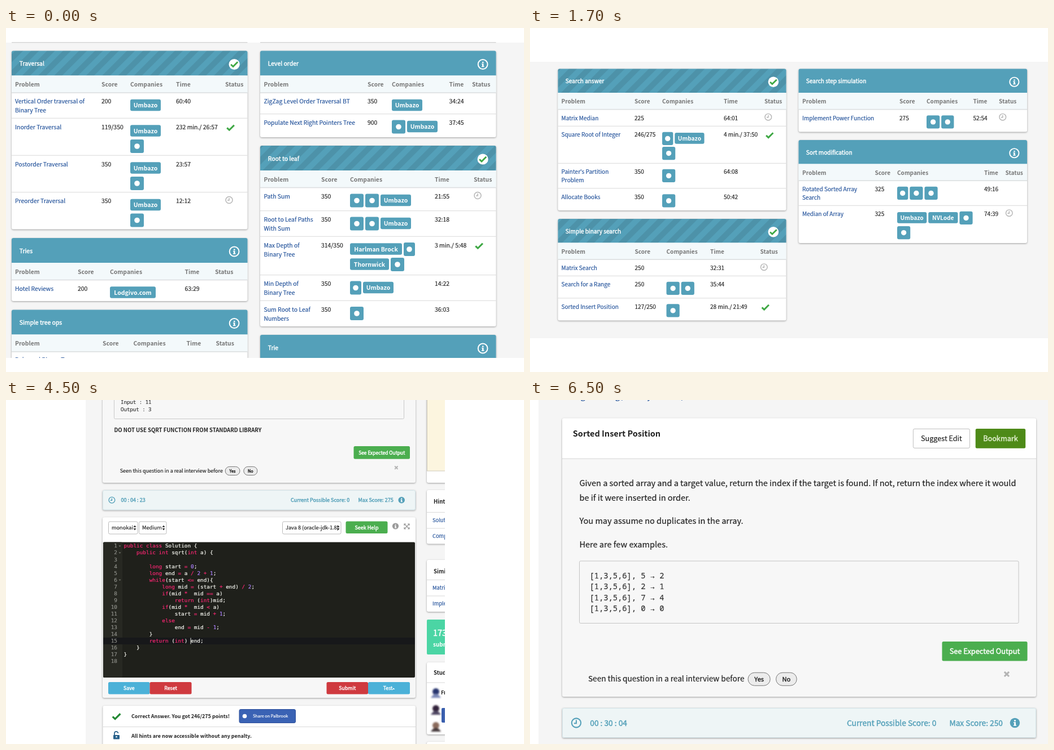
Write an HTML page that moves like this. It is 917 by 611 pixels and loops after 8 s.

```html
<!DOCTYPE html>
<html lang="en">
<head>
<meta charset="utf-8">
<title>Coding practice</title>
<style>
  html, body { margin: 0; width: 100%; height: 100%; overflow: hidden; background: #fff; }
  svg { display: block; width: 917px; height: 611px; }
  text { font-family: "Noto Sans CJK SC", "Noto Sans CJK JP", "Noto Sans CJK", "Open Sans", sans-serif;
         fill: currentColor; stroke: currentColor; stroke-width: .18; white-space: pre; }
  .m { stroke-width: .42; }
  .b { font-weight: 700; stroke-width: 0; }
  .mono { font-family: "Noto Sans Mono", "DejaVu Sans Mono", monospace; }
  .code { font-family: "DejaVu Sans Mono", monospace; stroke-width: .2; }
  .card { filter: drop-shadow(0 1px 1.5px rgba(0, 0, 0, .36)); }
</style>
</head>
<body>
<svg id="stage" viewBox="0 0 917 611" xmlns="http://www.w3.org/2000/svg"></svg>
<script>
const TEAL = '#54a0b9', LINK = '#24539b', INK = '#222', GREEN = '#4bae4f', PAGE = '#f5f5f5', BODY = '#f7f7f7';
const LINE = '#d9d9d9', MUTED = '#777', CODE_RED = '#bd1442', BLUE = '#4bb1d8', RED = '#cf3a3f';

const esc = s => String(s).replace(/&/g, '&amp;').replace(/</g, '&lt;');
const text = (x, y, s, size, color = INK, cls = '', anchor = 'start') =>
  `<text x="${x}" y="${y}" font-size="${size}" color="${color}" class="${cls}" text-anchor="${anchor}">${esc(s)}</text>`;
const rect = (x, y, w, h, fill, r = 0, extra = '') =>
  `<rect x="${x}" y="${y}" width="${w}" height="${h}" rx="${r}" fill="${fill}" ${extra}/>`;
const edge = color => `stroke="${color}" stroke-width="1"`;
const card = (x, y, w, h, fill = '#fff') => rect(x, y, w, h, fill, 3, 'class="card"');
const rule = (x, y, w, color = LINE) => rect(x, y - .5, w, 1, color);
const dot = (x, y, r, fill, extra = '') => `<circle cx="${x}" cy="${y}" r="${r}" fill="${fill}" ${extra}/>`;
const path = (d, color, width, extra = '') =>
  `<path d="${d}" fill="none" stroke="${color}" stroke-width="${width}" ${extra}/>`;
const at = (x, y, k, body) => `<g transform="translate(${x} ${y}) scale(${k})">${body}</g>`;

// icons, drawn around their centre
const tick = (x, y, k, color = '#3fa845') => at(x, y, k, path('M-6.3 .3L-2.2 4.2L6.4 -4.4', color, 3));
const clock = (x, y, r, color, width) =>
  at(x, y, r / 6, dot(0, 0, 6, 'none', `stroke="${color}" stroke-width="${width}"`) + path('M0 -3.6V.6H-3', color, width));
const glyphI = color => `<path d="M-1.3 -5h2.8v2.4h-2.8zM-2.3 -1.4h3.8v5h1.1v1.6h-5v-1.6h1.2v-3.4h-1.1z" fill="${color}"/>`;
const infoRing = (x, y, k) => at(x, y, k, dot(0, 0, 8.4, 'none', 'stroke="#fff" stroke-width="2"') + at(0, 0, .9, glyphI('#fff')));
const infoDisc = (x, y, r, color) => at(x, y, r / 8.5, dot(0, 0, 8.5, color) + glyphI('#fff'));
const doneDisc = (x, y, k) => dot(x, y, 9.6 * k, '#fff') + tick(x, y, .95 * k);
const cross = (x, y, k) => at(x, y, k, path('M-4 -4L4 4M4 -4L-4 4', '#b4b4b4', 3));

function button(x, y, w, h, label, size, fill, color = '#fff', border = 'none') {
  return rect(x, y, w, h, fill, 2.5, edge(border)) +
    text(x + w / 2, y + h / 2 + size * .37, label, size, color, border === 'none' ? 'm' : '', 'middle');
}

// company chips: a word is a label, a number is the width of a plain tile
const chipWidth = { 'Umbazo': 54, 'Lodgivo.com': 81, 'Harlman Brock': 92, 'Thornwick': 69, 'NVLode': 54 };
function chips(x, base, lines, k) {
  let out = '';
  lines.forEach((line, i) => {
    let left = x;
    const mid = base + (3 + 27 * i) * k;
    for (const c of line) {
      const tile = typeof c === 'number', w = (tile ? c : chipWidth[c]) * k, h = (tile ? 24 : 20.5) * k;
      out += rect(left, mid - h / 2 + (tile ? .5 : 0), w, h, TEAL, 3) + (tile
        ? dot(left + w / 2, mid + .5, 4.8 * k, '#fff')
        : text(left + w / 2, mid + 4.2 * k, c, 10.5 * k, '#fff', 'b', 'middle'));
      left += w + 3 * k;
    }
  });
  return out;
}

const HEADS = ['Problem', 'Score', 'Companies', 'Time', 'Status'];
// rows: [baseline, problem, score, chips, time, status]
function panel(k, x, y, w, bottom, title, done, cols, rows) {
  const head = 44 * k, size = 10.4 * k, first = y + 74.5 * k;
  const shape = `M${x} ${y + head}V${y + 3}q0 -3 3 -3h${w - 6}q3 0 3 3V${y + head}z`;
  let out = card(x, y, w, bottom - y) + `<path d="${shape}" fill="${TEAL}"/>`;
  if (done) out += `<path d="${shape}" fill="url(#stripes)"/>`;
  out += text(x + 13.8 * k, y + 26.7 * k, title, size, '#fff', 'm');
  out += (done ? doneDisc : infoRing)(x + w - 23.4 * k, y + 24 * k, k);
  out += rect(x, y + head, w, first - y - head, '#f3f9fb');
  out += rect(x, first - .8, w, 1.6, '#dcdfe0');
  HEADS.forEach((h, i) => { out += text(cols[i], y + 63.8 * k, h, size, MUTED, 'b'); });
  rows.forEach(([base, problem, score, firms, time, status], i) => {
    if (i) out += rule(x, base - 19.3 * k, w);
    problem.split('\n').forEach((s, n) => { out += text(cols[0], base + 16 * k * n, s, size, LINK); });
    out += text(cols[1], base, score, size) + chips(cols[2], base, firms, k) + text(cols[3], base, time, size);
    if (status === 'done') out += tick(cols[4] + 9.5 * k, base - 2.5 * k, k);
    if (status === 'late') out += clock(cols[4] + 7 * k, base - 5.5 * k, 6 * k, '#b5b5b5', 1.5);
  });
  return out;
}

const U = 'Umbazo';

function treeTopics() {
  const p = (...a) => panel(1, ...a);
  return `<g clip-path="url(#band)">` + rect(0, 26, 917, 560, PAGE) +
    rect(10, 25, 417.5, 1.4, '#d4d4d4') + rect(450, 25, 417.5, 1.4, '#d4d4d4') +
    p(10, 40.5, 417.5, 357.5, 'Traversal', true, [16, 169, 220, 301, 388], [
      [134, 'Vertical Order traversal of\nBinary Tree', '200', [[U]], '60:40'],
      [179.5, 'Inorder Traversal', '119/350', [[U], [24]], '232 min./ 26:57', 'done'],
      [245.5, 'Postorder Traversal', '350', [[U], [24]], '23:57'],
      [311, 'Preorder Traversal', '350', [[U], [24]], '12:12', 'late']]) +
    p(10, 373, 417.5, 485, 'Tries', false, [16, 127, 184, 316.5, 370], [
      [466.5, 'Hotel Reviews', '200', [['Lodgivo.com']], '63:29']]) +
    p(10, 500.5, 417.5, 640, 'Simple tree ops', false, [16, 171, 225.5, 319.5, 371.5], [
      [593, 'Balanced Binary Tree', '', [], '']]) +
    p(450, 40.5, 417.5, 194, 'Level order', false, [456.5, 640, 683, 784.5, 825], [
      [134, 'ZigZag Level Order Traversal BT', '350', [[U]], '34:24'],
      [172, 'Populate Next Right Pointers Tree', '900', [[24, U]], '37:45']]) +
    p(450, 209, 417.5, 530, 'Root to leaf', true, [456.5, 558, 609, 759, 828], [
      [303, 'Path Sum', '350', [[24, 24, U]], '21:55', 'late'],
      [344, 'Root to Leaf Paths\nWith Sum', '350', [[24, 24, U]], '32:18'],
      [389.5, 'Max Depth of\nBinary Tree', '314/350', [['Harlman Brock', 20], ['Thornwick', 24]], '3 min./ 5:48', 'done'],
      [458, 'Min Depth of\nBinary Tree', '350', [[20, U]], '14:22'],
      [503.5, 'Sum Root to Leaf\nNumbers', '350', [[24]], '36:03']]) +
    p(450, 545, 417.5, 660, 'Trie', false, [456.5, 640, 683, 784, 825], []) + `</g>`;
}

function searchTopics() {
  const p = (...a) => panel(.968, ...a);
  return rect(0, 60, 917, 491, PAGE) +
    p(49.5, 72.5, 404, 324, 'Search answer', true, [55.5, 185, 234, 343, 415], [
      [163.5, 'Matrix Median', '225', [], '64:01', 'late'],
      [193, 'Square Root of Integer', '246/275', [[20, U], [24]], '4 min./ 37:50', 'done'],
      [259, "Painter's Partition\nProblem", '350', [[24]], '64:08'],
      [303.5, 'Allocate Books', '350', [[24]], '50:42']]) +
    p(49.5, 339, 404, 519.5, 'Simple binary search', true, [55.5, 185.5, 241.5, 319, 407.5], [
      [430, 'Matrix Search', '250', [], '32:31', 'late'],
      [459, 'Search for a Range', '250', [[24, 24]], '35:44'],
      [498.5, 'Sorted Insert Position', '127/250', [[24]], '28 min./ 21:49', 'done']]) +
    p(475.5, 72.5, 404.5, 184.5, 'Search step simulation', false, [482, 654, 702, 784.5, 830], [
      [163.5, 'Implement Power Function', '275', [[24, 23]], '52:54', 'late']]) +
    p(475.5, 199, 404.5, 382, 'Sort modification', false, [482, 610.5, 650, 804, 841.5], [
      [290, 'Rotated Sorted Array\nSearch', '325', [[20, 24, 24]], '49:16'],
      [334, 'Median of Array', '325', [[U, 'NVLode', 24], [24]], '74:39', 'late']]);
}

// question card: header with title and two buttons
function questionHead(x, y, w, h, k, title) {
  const right = x + w, head = 70.5 * k;
  return card(x, y, w, h, BODY) + rect(x, y, w, head, '#fff', 3) + rule(x, y + head, w, '#d5d5d5') +
    text(x + 18.5 * k, y + 32 * k, title, 14.25 * k, INK, 'b') +
    button(right - 214 * k, y + 18.5 * k, 98.5 * k, 33.5 * k, 'Suggest Edit', 12.4 * k, '#fff', INK, '#bdbdbd') +
    button(right - 105.5 * k, y + 18.3 * k, 87 * k, 34 * k, 'Bookmark', 12.5 * k, '#4e8a18', '#e3f0d2');
}

// question card: green button and interview poll; y is the top of the button
function questionFoot(x, right, y, k) {
  const chip = (dx, w, s) => rect(x + dx * k, y + 54.3 * k, w * k, 22.7 * k, '#ececec', 11.3 * k, edge('#777')) +
    text(x + (dx + w / 2) * k, y + 70 * k, s, 10.8 * k, INK, 'm', 'middle');
  return button(right - 148.5 * k, y, 148.5 * k, 34 * k, 'See Expected Output', 12.6 * k, GREEN) +
    text(x, y + 70 * k, 'Seen this question in a real interview before', 13.4 * k) +
    chip(278.3, 38.5, 'Yes') + chip(327, 36, 'No') + cross(right - 36 * k, y + 57 * k, k);
}

function timerBar(x, y, w, h, k, time, max, scoreX, maxX) {
  const mid = y + h / 2, base = mid + 5 * k, size = 13.5 * k, right = x + w;
  return card(x, y, w, h, '#eef5f6') + rect(x + .5, y + .5, w - 1, h - 1, 'none', 3, edge('#d3e4e8')) +
    clock(x + 24.5 * k, mid, 8 * k, TEAL, 1.5) + text(x + 48.5 * k, base, time, size, TEAL, 'm') +
    text(scoreX, base, 'Current Possible Score: 0', size, TEAL, 'm') +
    text(maxX, base, 'Max Score: ' + max, size, TEAL, 'm') + infoDisc(right - 37 * k, mid, 8.6 * k, TEAL);
}

function sqrtQuestion() {
  const pill = (x, base, w, s) => rect(x, base - 16, w, 22, '#ebebeb', 3) + text(x + 5.8, base, s, 13.42, CODE_RED, 'mono');
  const body = (x, y, s, cls) => text(x, y, s, 14.3, INK, cls);
  return rect(0, 42, 917, 527, PAGE) + questionHead(28.5, 56, 825, 506.5, 1, 'Square Root of Integer') +
    body(59, 175, 'Implement int') + pill(157, 175, 101, 'sqrt(int x)') + body(257.5, 175, '.') +
    body(59, 216, 'Compute and return the') + body(222.5, 216, 'square root of', 'b') +
    pill(325.5, 216, 19, 'x') + body(345, 216, '.') +
    body(59, 257, 'If') + pill(71, 257, 18.5, 'x') + body(93, 257, 'is not a perfect square, return') +
    pill(293, 257, 124, 'floor(sqrt(x))') + body(59, 298, 'Example :', 'b') +
    rect(59.5, 321.5, 763.5, 71, BODY, 2, edge('#c4c4c4')) +
    text(76, 352, 'Input : 11', 13.5, '#333', 'mono') + text(76, 371, 'Output : 3', 13.5, '#333', 'mono') +
    text(59, 427, 'DO NOT USE SQRT FUNCTION FROM STANDARD LIBRARY', 14.2, INK, 'b') +
    questionFoot(73.5, 838, 465, 1) +
    card(883, 56, 60, 506.5) + rule(883, 113.5, 34, '#bbb') + text(901, 88, 'Notes', 14.25, INK, 'b') +
    rect(883.5, 114, 60, 417, '#fcf5df', 0, edge('#cfcabb')) + rect(884, 114, 33, 16, '#ebe3cc') + rect(888.5, 115, 1, 14, '#777');
}

const PROGRAM = `public class Solution {
    public int sqrt(int a) {

        long start = 0;
        long end = a / 2 + 1;
        while(start <= end){
            long mid = (start + end) / 2;
            if(mid *  mid == a)
                return (int)mid;
            if(mid *  mid < a)
                start = mid + 1;
            else
                end = mid - 1;
        }
        return (int) end;
    }
}
`;

function colorOf(token) {
  if (/^(public|class|int|long|while|if|return|else)$|^[=<*+\/-]+$/.test(token)) return '#f92672';
  return /^\d+$/.test(token) ? '#ae81ff' : '#f8f8f2';
}

function editor() {
  const step = 12.06, size = 9.4;
  let out = rect(172, 252.5, 552, 240.5, '#1f201b', 2) + rect(172, 252.5, 34, 240.5, '#272822', 2) +
    rect(172, 422, 552, 12, '#17181a');
  PROGRAM.split('\n').forEach((line, i) => {
    const y = 262.4 + step * i;
    out += text(197, y, i + 1, size, '#8f908a', 'code', 'end');
    if ([0, 1, 5].includes(i)) out += `<path d="M199.5 ${y - 4}h4l-2 2.4z" fill="#77786f"/>`;
    const spans = line.split(/(\w+|[=<*+\/-]+)/).map(t => `<tspan fill="${colorOf(t)}" stroke="${colorOf(t)}">${esc(t)}</tspan>`);
    out += `<text x="208.5" y="${y}" font-size="${size}" class="code">${spans.join('')}</text>`;
  });
  return out + rect(326.5, 422.5, 1, 11, '#e8e8e0');
}

function sideColumn() {
  const list = (y, h, head, title, items) => card(745, y, 60, h) + text(757, y + 24, title, 9.6, INK, 'b') +
    rule(745, y + head, 60) + items.map((s, i) =>
      (i ? rule(745, y + head + 28.5 * i, 60) : '') + text(755, y + head + 17.5 + 28.3 * i, s, 9.3, LINK)).join('');
  const face = (y, top, low) => `<g filter="url(#soft)">` + dot(761, y - 2, 6, top) +
    `<path d="M752 ${y + 9}q9 -14 18 0z" fill="${low}"/></g>`;
  return card(745, -20, 60, 167) + rect(745.5, -20, 60, 146, '#fcf5df', 0, edge('#cfcabb')) +
    list(160, 95.5, 39.5, 'Hints', ['Solution', 'Complete']) +
    list(284, 92, 35.5, 'Similar', ['Matrix', 'Implement']) +
    rect(745, 390, 60, 62, '#4bd5a4', 2) + text(756, 418.5, '173', 14.5, '#fff', 'm') +
    text(756, 437.5, 'submissions', 10, '#fff', 'b') +
    card(745, 466, 60, 128) + text(757, 487.5, 'Students', 9.6, INK, 'b') + rule(745, 502, 60) +
    face(520, '#28346e', '#7c88b8') + face(550, '#33203a', '#4d4460') + face(580, '#8a6a5c', '#463a3c') +
    text(770, 523, 'Friends', 9, INK, 'b') + rect(771, 547, 30, 26, '#3a5fae', 2) + card(745, 607, 60, 30);
}

function solution() {
  const k = .67;
  const select = (x, w, s) => rect(x, 216, w, 22, '#fff', 2.5, edge('#bbb')) + text(x + 5.5, 230.4, s, 9.2) +
    `<path d="M${x + w - 7.5} 226h5l-2.5 -3.6zM${x + w - 7.5} 228h5l-2.5 3.6z" fill="#333"/>`;
  const action = (x, w, s, fill) => button(x, 501, w, 21.5, s, 8.8, fill);
  return `<g clip-path="url(#column)">` + rect(141, 0, 636, 611, PAGE) +
    card(171, -30, 554, 177, BODY) + rect(191.5, -20, 513, 53.5, BODY, 2, edge('#c9c9c9')) +
    text(203, 7, 'Input : 11', 9.1, '#333', 'mono') + text(203, 19.5, 'Output : 3', 9.1, '#333', 'mono') +
    text(191.5, 56.5, 'DO NOT USE SQRT FUNCTION FROM STANDARD LIBRARY', 9.52, INK, 'b') +
    questionFoot(201.7, 715, 82, k) +
    timerBar(171, 160, 554, 35.5, k, '00 : 04 : 23', 275, 504, 623.5) +
    card(171, 208.5, 554, 320.5, BODY) + rect(171, 208.5, 554, 44, '#fff', 3) +
    select(181.5, 51.5, 'monokai') + select(235.5, 48.5, 'Medium') + select(489.5, 103.5, 'Java 8 (oracle-jdk-1.8)') +
    button(601.5, 215.5, 74, 21.5, 'Seek Help', 9, GREEN) + infoDisc(689.5, 224, 5.6, '#9a9a9a') +
    at(709.5, 224.5, 1, path('M-4 -4L4 4M4 -4L-4 4M-4.5 -1.5V-4.5H-1.5M1.5 -4.5H4.5V-1.5M4.5 1.5V4.5H1.5M-1.5 4.5H-4.5V1.5', '#9a9a9a', 1.2)) +
    editor() +
    action(181, 73.5, 'Save', BLUE) + action(254.5, 74, 'Reset', RED) +
    action(567.5, 73.5, 'Submit', RED) + action(641, 74, 'Test  ', BLUE) +
    `<path d="M683.5 514h5l-2.5 -2.6z" fill="#fff"/>` +
    card(171.5, 543, 553.5, 90) + rule(171.5, 580.5, 553.5) + tick(195.5, 562, 1.08, '#258a35') +
    text(222, 565, 'Correct Answer. You got 246/275 points!', 8.95, INK, 'b') +
    rect(413, 549.5, 99.5, 24, '#3a62b4', 2.5, edge('#2f519b')) + dot(422.5, 561.5, 3.8, '#fff') +
    text(437, 564.3, 'Share on Palbrook', 7.3, '#fff') +
    at(195.5, 596, 1, rect(-5.5, -1, 11, 7.5, '#28618b', 1) + path('M-3.5 -1V-4a3.2 3.2 0 0 1 6.4 0', '#28618b', 1.7) + dot(0, 2.3, 1.3, '#fff')) +
    text(222, 599.5, 'All hints are now accessible without any penalty.', 8.95, INK, 'b') +
    sideColumn() + `</g>`;
}

function insertQuestion() {
  const k = 1.017;
  const lines = [[153, 'Given a sorted array and a target value, return the index if the target is found. If not, return the index where it would'],
    [178.5, 'be if it were inserted in order.'], [220, 'You may assume no duplicates in the array.'], [262, 'Here are few examples.']];
  const samples = ['5 → 2', '2 → 1', '7 → 4', '0 → 0'];
  return rect(15, 0, 902, 611, PAGE) + text(66, -2, 'Programming / Binary Search /', 14.5, LINK) +
    questionHead(57, 32.5, 839, 494.5, k, 'Sorted Insert Position') +
    lines.map(([y, s]) => text(87.5, y, s, 14.52)).join('') +
    rect(87.5, 286, 777.5, 110.5, BODY, 2, edge('#c4c4c4')) +
    samples.map((s, i) => text(105.5, 317 + 19.3 * i, '[1,3,5,6], ' + s, 13.75, '#333', 'mono')).join('') +
    questionFoot(103, 880.5, 429, k) +
    timerBar(57, 547, 839, 53, k, '00 : 30 : 04', 250, 561, 742.5);
}

const DEFS = `<defs>
  <pattern id="stripes" width="20" height="20" patternUnits="userSpaceOnUse" patternTransform="rotate(45)">
    <rect width="10" height="20" fill="#000" opacity=".085"/></pattern>
  <clipPath id="band"><rect y="24.5" width="917" height="561.5"/></clipPath>
  <clipPath id="column"><rect x="141" width="636" height="611"/></clipPath>
  <filter id="soft" x="-50%" y="-50%" width="200%" height="200%"><feGaussianBlur stdDeviation="1.8"/></filter>
</defs>`;

const scenes = [[0, treeTopics], [500, searchTopics], [2500, sqrtQuestion], [4500, solution], [6500, insertQuestion]];
const LOOP = 8000;
const stage = document.getElementById('stage');
stage.innerHTML = DEFS + scenes.map(([, draw]) => `<g class="scene">${draw()}</g>`).join('');
const layers = [...stage.querySelectorAll('.scene')];

function show(ms) {
  const now = ms % LOOP;
  const current = scenes.filter(([start]) => start <= now).length - 1;
  layers.forEach((g, i) => { g.style.display = i === current ? '' : 'none'; });
}

const begin = performance.now();
function frame() {
  show(performance.now() - begin);
  requestAnimationFrame(frame);
}
frame();
</script>
</body>
</html>
```
